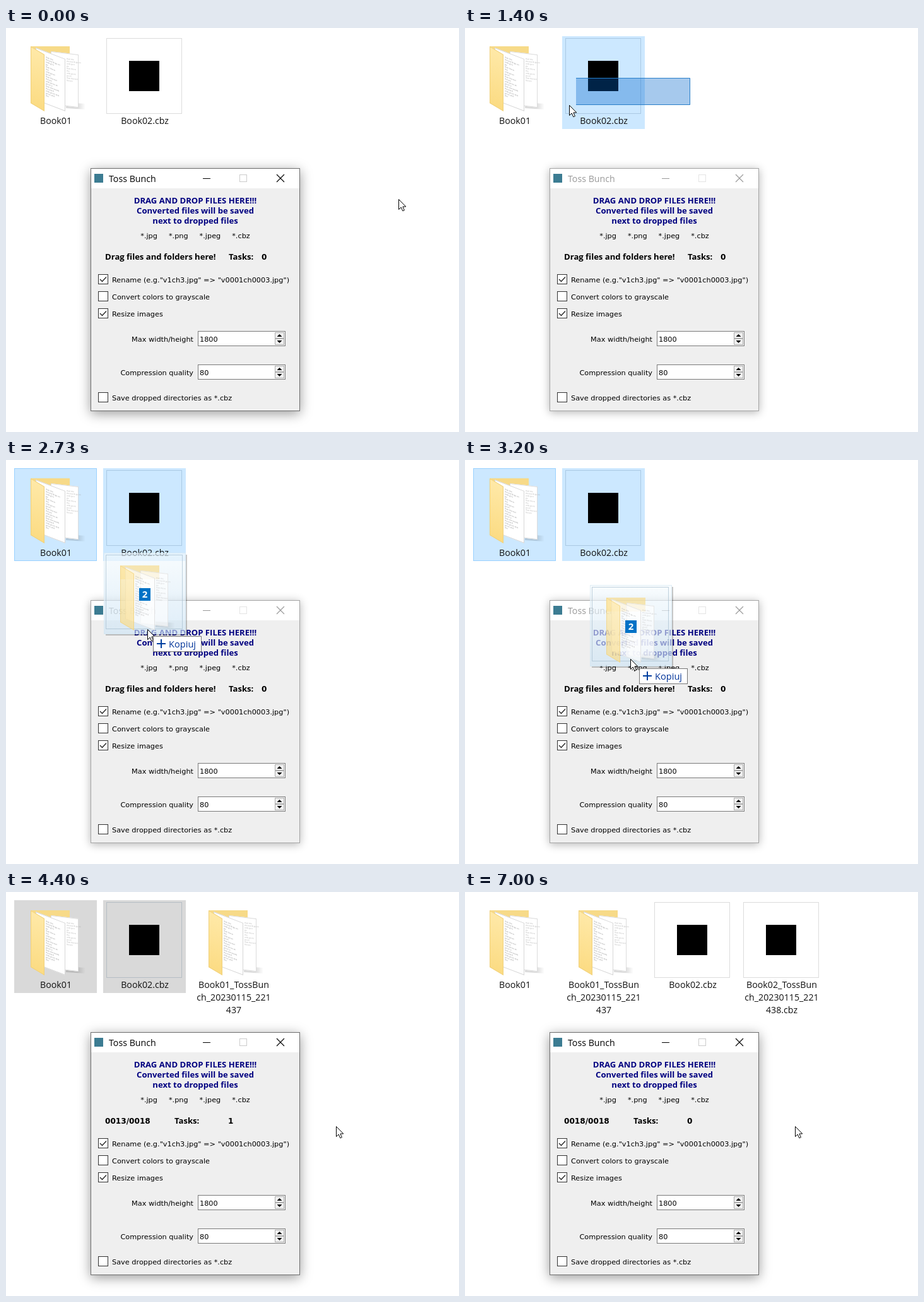
Recreate the animation shown at these times as an HTML page with a canvas. Size 718 by 640 pixels, loop 7190 ms.

```html
<!DOCTYPE html>
<html>
<head>
<meta charset="utf-8">
<style>
html, body { margin: 0; width: 718px; height: 640px; overflow: hidden; background: #fff; }
canvas { display: block; }
</style>
</head>
<body>
<canvas id="stage" width="718" height="640"></canvas>
<script>
const g = document.getElementById('stage').getContext('2d');
const LOOP = 7190, STEP = 200 / 3;
const SANS = '"Open Sans", "Noto Sans", sans-serif', WIDE = '"DejaVu Sans", sans-serif';
const PLAIN = '11.3px ' + WIDE, DIGITS = 'bold 12.1px ' + WIDE;
const BOLD = 'bold 13.1px ' + SANS, LABEL = '14.2px ' + SANS;

// Moments of the story, ms
const PRESS = 860, PICK_CBZ = 1130, PICK_BOOK = 1590, RELEASE = 1860, DRAG = 2260, DROP = 3390;
const COPIED = 4060, SWAP = 4730, UNPACK = 5190, PACKED = 6260, DONE = 6790;

// Pointer stops: time, x, y
const STOPS = [
  [0, 622, 271], [867, 357, 79], [1400, 165, 122], [1650, 78, 118], [2267, 78, 116],
  [2733, 224, 268], [3200, 262, 315], [3400, 262, 315], [3867, 556, 568], [4267, 523, 371]
];

function pointer(t) {
  const i = STOPS.findIndex(p => p[0] > t);
  if (i < 0) return STOPS[STOPS.length - 1].slice(1);
  const a = STOPS[Math.max(0, i - 1)], b = STOPS[i];
  const k = Math.max(0, (t - a[0]) / (b[0] - a[0] || 1));
  return [1, 2].map(n => a[n] + (b[n] - a[n]) * k);
}

function at(x, y, paint) {
  g.save();
  g.translate(x, y);
  paint();
  g.restore();
}

function box(x, y, w, h, fill, line) {
  if (fill) { g.fillStyle = fill; g.fillRect(x, y, w, h); }
  if (line) { g.strokeStyle = line; g.lineWidth = 1; g.strokeRect(x + .5, y + .5, w - 1, h - 1); }
}

function shape(path, fill, line, width = 1) {
  const p = new Path2D(path);
  if (fill) { g.fillStyle = fill; g.fill(p); }
  if (line) { g.strokeStyle = line; g.lineWidth = width; g.stroke(p); }
}

function text(s, x, y, font = PLAIN, color = '#000', align = 'left') {
  g.font = font;
  g.fillStyle = color;
  g.textAlign = align;
  g.fillText(s, x, y);
}

function blend(x0, y0, x1, y1, from, to) {
  const c = g.createLinearGradient(x0, y0, x1, y1);
  c.addColorStop(0, from);
  c.addColorStop(1, to);
  return c;
}

// Upright sheet whose right side sits lower by drop, with optional tiny print
function sheet(x, y, w, drop, h, fill, line, rows = 0, left = 0, ink = '#888') {
  const words = 'then the words go on and so does a line of it';
  g.save();
  g.transform(1, drop / w, 0, 1, x, y);
  box(0, 0, w, h, fill, line);
  for (let i = 0; i < rows; i++) {
    text(words.substr(i * 5 % 20, 3 + (i * 7 + 5) % 13), left, 10 + i * 3.8, '3px ' + SANS, ink);
  }
  g.restore();
}

// Icons are drawn relative to the corner of a 131 x 147 cell
function folder() {
  sheet(82, 105, 31, 2, 9, blend(18, 0, 31, 0, 'rgba(0,0,0,.14)', 'rgba(0,0,0,0)'));
  sheet(26, 16, 62, 0, 22, '#f7da88');
  sheet(58, 24, 44, 5, 84, '#fff', '#dcdcdc', 10, 25, '#aaa');
  sheet(34, 18, 47, 18, 83, '#fff', '#d6d6d6', 17, 16);
  sheet(26, 16, 22, 13, 90, blend(0, 0, 22, 90, '#ffe9a8', '#fbdb82'), '#f0d07a');
}

function archive(selected) {
  box(5, 3, 120, 120, selected ? null : '#fff', selected ? 'rgba(0,50,90,.17)' : '#dcdcdc');
  box(41, 39, 48, 48, '#000');
}

function item(col, label, icon, fill, line) {
  at(13 + col * 141, 13, () => {
    if (fill) box(0, 0, 131, 147, fill, line);
    icon(!!fill);
    label.split('|').forEach((s, i) => text(s, 66, 139 + i * 20, LABEL, '#111', 'center'));
  });
}

function files(t) {
  const gray = t >= DROP;
  const tint = start => t >= start && t < PACKED ? (gray ? '#d9d9d9' : '#cce8ff') : null;
  const first = 'Book01_TossBun|ch_20230115_221|437';
  const second = 'Book02_TossBun|ch_20230115_221|438';
  const cbz = t < SWAP ? 1 : t < UNPACK || t >= PACKED ? 2 : 4;
  item(0, 'Book01', folder, tint(PICK_BOOK), gray ? null : '#99d1ff');
  item(cbz, 'Book02.cbz', archive, tint(PICK_CBZ));
  if (t >= COPIED) item(t < SWAP ? 2 : 1, first, folder);
  if (t >= PACKED) {
    item(3, second + '.cbz', archive);
  } else if (t >= UNPACK) {
    item(2, second, folder);
    item(3, 'tmp_Book02_Tos|sBunch_20230115|_221438', folder);
  }
}

function check(y, label, ticked) {
  at(146, y, () => {
    box(0, 0, 16, 16, '#fff', '#333');
    if (ticked) shape('M3 8l3.5 3.5l6.5 -7', null, '#222', 1.3);
    text(label, 22, 13);
  });
}

function spin(y, label, value) {
  text(label, 297, y + 17, PLAIN, '#000', 'right');
  box(304, y, 139, 24, '#fff', '#7a7a7a');
  text(value, 307, y + 17);
  for (const tip of [-1, 1]) {
    at(433.5, y + 12 + tip * 5, () => {
      box(-7.5, -5, 15, 10, '#f0f0f0', '#adadad');
      g.scale(1, tip);
      shape('M-4 -2h8l-4 4z', '#000');
    });
  }
}

function status(t) {
  if (t < DROP) {
    text('Drag files and folders here!', 157, 367, BOLD);
    text('Tasks:', 353, 367, BOLD);
    text('0', 405, 367, DIGITS);
    return;
  }
  const start = t < 4940 ? 3467 : 4950;
  const n = Math.max(1, Math.min(18, Math.floor((t - start) / 70)));
  text(String(n).padStart(4, '0') + '/0018', 157, 367, DIGITS);
  text('Tasks:', 267, 367, BOLD);
  text(t < DONE ? '1' : '0', 352, 367, DIGITS);
}

function appWindow(t) {
  const active = t < PRESS || t >= DROP, ink = active ? '#000' : '#999';
  g.save();
  g.shadowColor = `rgba(0,0,0,${active ? .4 : .3})`;
  g.shadowBlur = active ? 18 : 13;
  g.shadowOffsetY = active ? 4 : 2;
  box(134, 222, 332, 385, '#efefef');
  g.restore();
  box(135, 223, 330, 31, '#fff');
  box(134, 222, 332, 385, null, active ? '#6e6e6e' : '#a5a5a5');
  box(140, 231, 14, 14, '#3c7c92');
  text('Toss Bunch', 163, 244, LABEL, ink);
  shape('M312 238.5h12', null, ink);
  box(370, 232, 12, 12, null, active ? '#ccc' : '#e4e4e4');
  shape('M429 232l12 12m0 -12l-12 12', null, ink, 1.1);

  ['DRAG AND DROP FILES HERE!!!', 'Converted files will be saved', 'next to dropped files']
    .forEach((s, i) => text(s, 300, 278 + i * 16, BOLD, '#000080', 'center'));
  text(['*.jpg', '*.png', '*.jpeg', '*.cbz'].join(' '.repeat(5)), 300, 333, PLAIN, '#000', 'center');
  status(t);
  check(390, 'Rename (e.g."v1ch3.jpg" => "v0001ch0003.jpg")', true);
  check(417, 'Convert colors to grayscale');
  check(444, 'Resize images', true);
  spin(480, 'Max width/height', '1800');
  spin(533, 'Compression quality', '80');
  check(577, 'Save dropped directories as *.cbz');
}

// Selection rectangle, trailing slightly behind the pointer
function marquee(t) {
  const [, right, top] = STOPS[1], [x, y] = pointer(t - 30).map(Math.round);
  const w = right - x, h = y + 2 - top;
  if (w < 1) return;
  box(x, top, w, h, 'rgba(0,102,204,.35)');
  shape(`M${x} ${top + .5}h${w - .5}v${h - 1}h${.5 - w}`, null, '#2a7fc9');
}

function dragged(x, y) {
  at(x - 63, y - 115, () => {
    g.fillStyle = 'rgba(0,0,0,.22)';
    g.fillRect(130, 3, 2, 128);
    g.fillRect(3, 129, 127, 2);
    g.globalAlpha = .65;
    box(0, 0, 130, 129, blend(0, 0, 0, 129, '#f4fafd', '#cde4f5'), '#d5e6f1');
    box(3, 3, 122, 118, null, '#a3bccd');
    at(0, 4, folder);
    g.globalAlpha = 1;
    box(56, 56, 18, 20, '#0072c6');
    text('2', 65, 71, 'bold 15px ' + SANS, '#fff', 'center');
  });
}

function hint(x, y) {
  at(x + 15, y + 17, () => {
    box(0, 0, 77, 25, '#fff', '#767676');
    shape('M6 12h14m-7 -7v14', null, '#003f9f', 2);
    text('Kopiuj', 25, 18, '14.6px ' + SANS, '#003399');
  });
}

function arrow(x, y) {
  at(Math.round(x) + .5, Math.round(y) + .5, () =>
    shape('M0 0v16l3.7 -3.5l2.6 5.8l2.6 -1.1l-2.5 -5.7h4.9z', '#fff', '#000'));
}

function draw(now) {
  const t = Math.floor((now % LOOP + 4) / STEP) * STEP;
  const [x, y] = pointer(t);
  box(0, 0, 718, 640, '#fff');
  files(t);
  appWindow(t);
  if (t > PRESS && t < RELEASE) marquee(t);
  const dragging = t >= DRAG && t < DROP;
  const held = pointer(t - 18).map(Math.round);
  if (dragging) dragged(...held);
  arrow(x, y);
  if (dragging && x > 134 && y > 222) hint(...held);
}

const begin = performance.now();
(function tick() {
  draw(performance.now() - begin);
  requestAnimationFrame(tick);
})();
</script>
</body>
</html>
```
